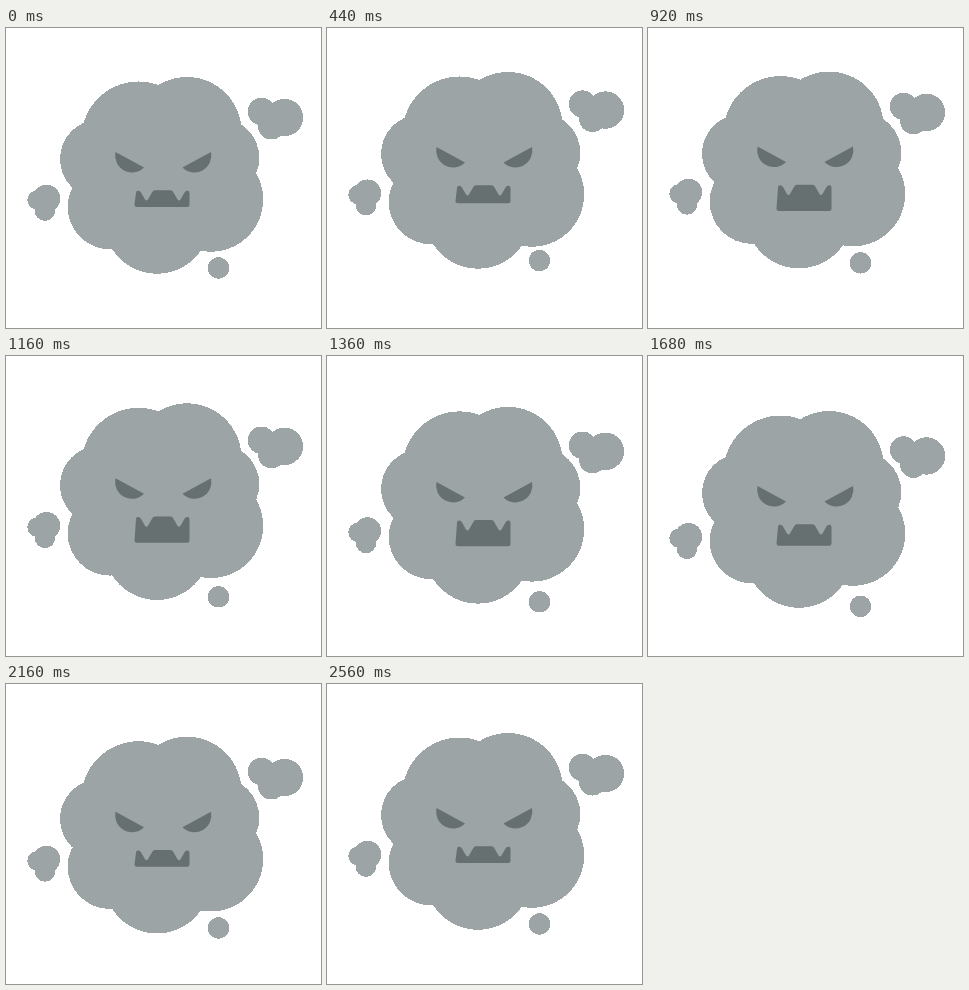
An HTML page that plays this animation: 315 by 300 pixels, repeating every 2.6 s.

```html
<!DOCTYPE html>
<html lang="en">
<head>
<meta charset="utf-8">
<title>Angry smog</title>
<style>
  html, body { margin: 0; height: 100%; overflow: hidden; background: #fff; }
  svg { display: block; width: 315px; height: 300px; fill: #9ca4a6; }
  circle { shape-rendering: crispEdges; }
  .face { fill: #667070; }
</style>
</head>
<body>
<svg viewBox="0 0 315 300">
  <g id="cloud">
    <circle cx="132.5" cy="110.5" r="57"/>
    <circle cx="181" cy="103.5" r="54.5"/>
    <circle cx="93.5" cy="131" r="39.5"/>
    <circle cx="213" cy="130" r="40.3"/>
    <circle cx="104" cy="179" r="42.3"/>
    <circle cx="205" cy="171.5" r="52.2"/>
    <circle cx="151" cy="192.5" r="53.2"/>
    <g class="face">
      <path id="eye" d="M109.5 124L138 139.5A16.9 16.9 0 0 1 109.5 124Z"/>
      <use href="#eye" transform="matrix(-1 0 0 1 314.5 0)"/>
      <path id="mouth"/>
    </g>
  </g>
  <g id="left">
    <circle cx="40.5" cy="170.5" r="13.7"/>
    <circle cx="31" cy="172" r="9.7"/>
    <circle cx="39" cy="182.7" r="10.2"/>
  </g>
  <g id="right">
    <circle cx="255.5" cy="83.5" r="13.7"/>
    <circle cx="278.5" cy="89.5" r="18.7"/>
    <circle cx="265.5" cy="98" r="13.5"/>
    <circle cx="212.5" cy="240" r="10.7"/>
  </g>
</svg>
<script>
const LOOP = 2600;
const byId = id => document.getElementById(id);

// Goes from 0 to 1 between two times, with a soft start and stop.
function ramp(t, from, to) {
  const x = Math.min(1, Math.max(0, (t - from) / (to - from)));
  return x * x * (3 - 2 * x);
}

// Rises to a high point, sinks to a low point, then returns to rest.
function bob(id, t, { rise, highAt, sink, lowAt, restAt }) {
  const y = (rise + sink) * ramp(t, highAt, lowAt)
    - rise * ramp(t, 0, highAt) - sink * ramp(t, lowAt, restAt);
  byId(id).setAttribute('transform', `translate(0 ${y})`);
}

// The teeth keep their place while the lower edge moves.
function openMouth(height) {
  const fang = 'l4 7q1.5 2 3 0l4-7';
  byId('mouth').setAttribute('d', `M130 165q0-2.3 2-2.3q2-.2 3 1.8${fang}
    q1-2.3 3-2.3h15.5q2 0 3 2.3${fang}q1-2 3-1.8q2 0 2 2.3
    V${159.5 + height}q0 2.5-2.5 2.5h-50q-2.5 0-2.5-2.5Z`);
}

function draw() {
  const t = performance.now() % LOOP;
  bob('cloud', t, { rise: 7, highAt: 680, sink: 6.5, lowAt: 1800, restAt: LOOP });
  bob('left', t, { rise: 8, highAt: 720, sink: 10.5, lowAt: 1760, restAt: 2520 });
  bob('right', t, { rise: 9, highAt: 600, sink: 10.5, lowAt: 1720, restAt: 2480 });
  openMouth(17 + 9.3 * (ramp(t, 320, 820) - ramp(t, 1340, 2020)));
  requestAnimationFrame(draw);
}
draw();
</script>
</body>
</html>
```
